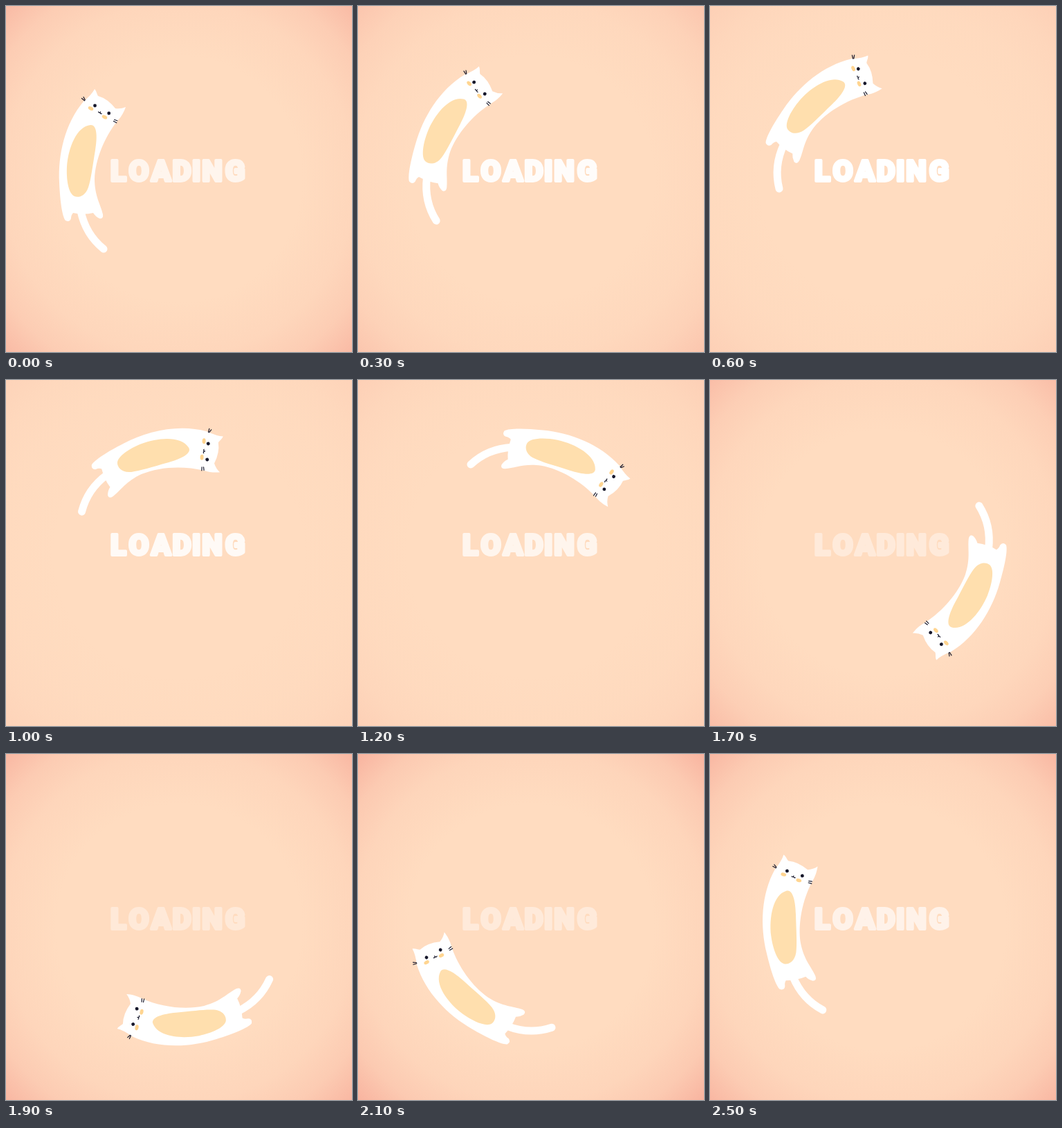
Write an HTML page that moves like this. It is 500 px wide and 500 px high and loops after 2.6 s.

```html
<!DOCTYPE html>
<html lang="en">
<head>
<meta charset="utf-8">
<title>Loading</title>
<style>
  html, body { margin: 0; height: 100%; overflow: hidden; background: #ffdcc0; }
  svg { display: block; width: 100%; height: 100%; }
  text { font: 900 42px Roboto, Inter, sans-serif; text-anchor: middle;
         fill: #fff; stroke: #fff; stroke-width: 4; stroke-linejoin: round; }
</style>
</head>
<body>
<svg viewBox="0 0 500 500">
  <defs>
    <radialGradient id="edge" gradientUnits="userSpaceOnUse" cx="250" cy="250" r="354">
      <stop offset=".5" stop-color="#f8b39f" stop-opacity="0"/>
      <stop offset=".72" stop-color="#f8b39f" stop-opacity=".17"/>
      <stop offset=".86" stop-color="#f8b39f" stop-opacity=".45"/>
      <stop offset="1" stop-color="#f8b39f"/>
    </radialGradient>
  </defs>
  <rect id="vignette" width="500" height="500" fill="url(#edge)"/>
  <text id="label" x="162.5 192 224 254 275 298 331" y="253">LOADING</text>
  <g id="cat" fill="none" stroke-linecap="round">
    <path d="M108 296Q115 330 141 351" stroke="#fff" stroke-width="11"/>
    <path fill="#fff" d="M128 120C131 123 131 127 133 130Q147 134 158 148Q166 149 173 146
      C171 152 167 160 161 166C142 190 129 222 128 250C128 275 137 287 140 301
      Q141 308 135 307Q129 304 126 299Q112 302 97 299Q94 302 94 307Q92 313 86 310
      C81 304 78 280 77 255C75 215 85 170 112 138Q124 128 128 120Z"/>
    <path fill="#ffdfae" d="M122 172C132 171 132 190 129 208C125 232 123 250 119 262
      C114 276 104 277 99 275C90 271 87 250 88 232C90 205 102 174 122 172Z"/>
    <g fill="#ffd591">
      <ellipse cx="122.5" cy="148" rx="4" ry="2.5" transform="rotate(28 122.5 148)"/>
      <ellipse cx="142.5" cy="160.5" rx="4" ry="2.5" transform="rotate(28 142.5 160.5)"/>
    </g>
    <g fill="#17182b">
      <circle cx="128.5" cy="144" r="2.4"/>
      <circle cx="148.7" cy="155" r="2.4"/>
    </g>
    <path stroke="#17182b" stroke-width="1.2" d="M133.5 153q1 2 2.7 .3q-.3 2.7 2 2.4
      M109.5 133.5l4 3.3M112 131.5l2.3 4.3M155.5 166.5l4.3 2.3M156.5 164.3l4.3 1.4"/>
  </g>
</svg>
<script>
const LOOP = 2600, STEP = 100;
const el = id => document.getElementById(id);
const cat = el('cat'), label = el('label'), vignette = el('vignette');

// [time in ms, turn in degrees]: slow over the top left, fast at the lower right
const keys = [[0, 0], [600, 36.9], [1000, 65.2], [1200, 98.3], [1400, 131.6], [1700, 198.7],
              [1800, 228.5], [2100, 302.7], [2400, 338.5], [2500, 349.1], [2600, 360]];
const count = keys.length - 1;

function key(i) {
  const lap = Math.floor(i / count), [t, a] = keys[i - lap * count];
  return [t + lap * LOOP, a + lap * 360];
}

function slope(i) {
  const [t0, a0] = key(i - 1), [t1, a1] = key(i + 1);
  return (a1 - a0) / (t1 - t0);
}

// Smooth cubic through the keys, continuous across the loop
function turn(t) {
  let i = 0;
  while (key(i + 1)[0] <= t) i++;
  const [t0, a0] = key(i), [t1, a1] = key(i + 1);
  const d = t1 - t0, u = (t - t0) / d, v = 1 - u;
  return a0 * v * v * (1 + 2 * u) + a1 * u * u * (3 - 2 * u)
       + d * u * v * (slope(i) * v - slope(i + 1) * u);
}

const wave = (t, peak) => Math.cos((t - peak) / LOOP * 2 * Math.PI);

function draw(now) {
  const t = Math.floor(now % LOOP / STEP) * STEP;
  cat.setAttribute('transform', `rotate(${turn(t)} 251 246)`);
  label.setAttribute('opacity', .69 + .31 * wave(t, 600));
  vignette.setAttribute('opacity', .6 + .4 * wave(t, 2200));
}

const start = performance.now();
function frame() {
  draw(performance.now() - start);
  requestAnimationFrame(frame);
}
frame();
</script>
</body>
</html>
```
